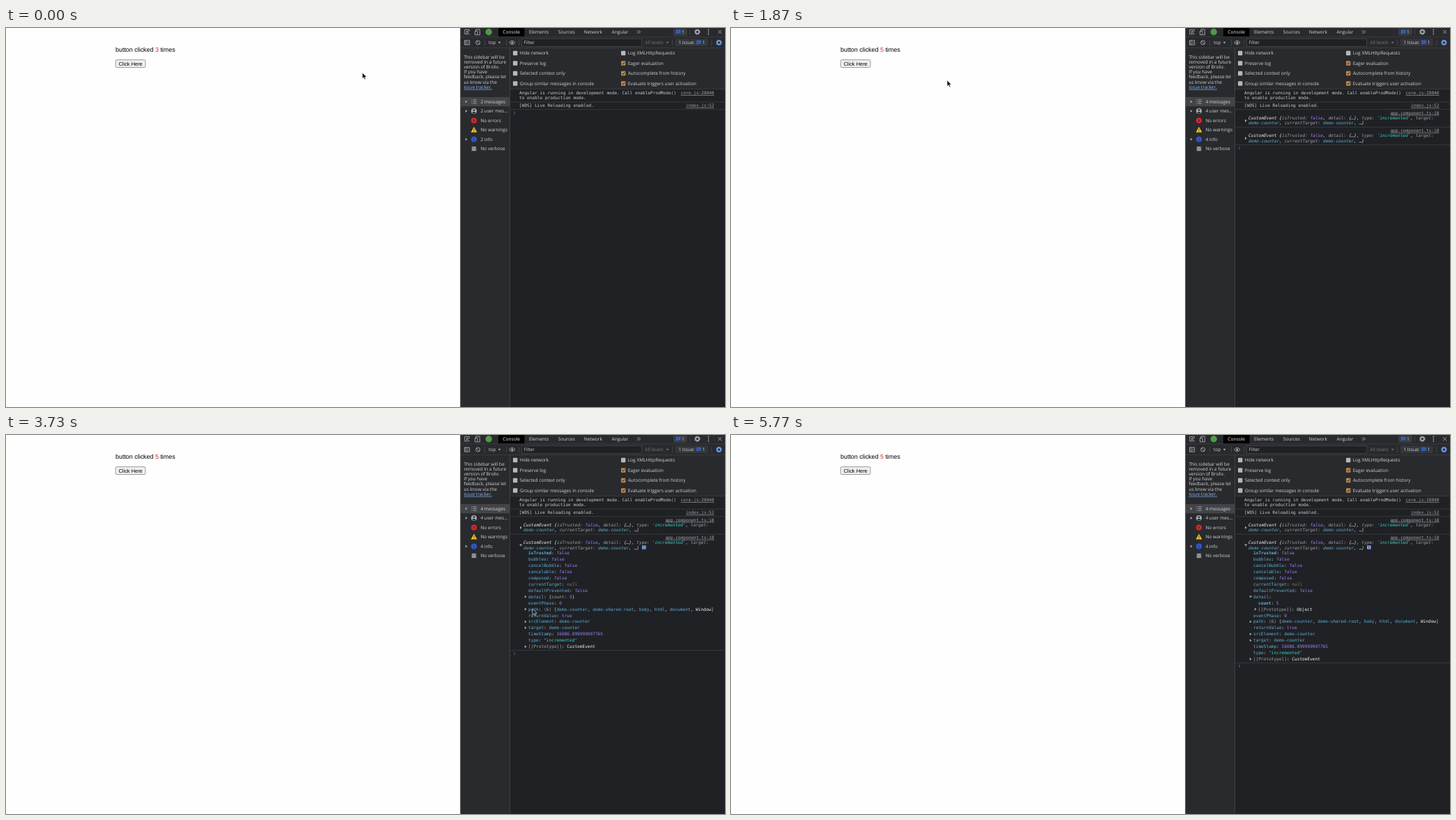
Animation, 1031 px wide and 543 px high, one loop 7.01 s. Source, as an HTML page:

```html
<!DOCTYPE html>
<html lang="en">
<head>
<meta charset="utf-8">
<title>Custom event counter</title>
<style>
  html, body { margin: 0; width: 100%; height: 100%; overflow: hidden; background: #fefefe; }
  svg { display: block; }
  text { white-space: pre; text-rendering: geometricPrecision; font: 6.6px "Open Sans", sans-serif; fill: #d0d3d6; }
  .page { font: 8.92px "Liberation Sans", sans-serif; fill: #000; }
  .label { font-size: 7.43px; }
  .mono { font: 6.13px "DejaVu Sans Mono", monospace; fill: #c9ccd0; }
  .it { font-style: italic; }
  .link { fill: #a3a7ab; text-decoration: underline; }
  .blue { fill: #8ab4f8; text-decoration: underline; }
  .dim { fill: #72767b; }
  .k { fill: #5db0d7; } .b { fill: #5db0d7; font-weight: bold; }
  .g { fill: #9aa0a6; } .p { fill: #9980ff; } .s { fill: #35d4c7; }
  .n { fill: #7f7f7f; } .w { fill: #f0f0f0; } .c { fill: #d0d3d6; } .r { fill: #d8282a; }
  .icon { fill: none; stroke: #a9adb2; stroke-width: .9; }
</style>
</head>
<body>
<svg id="stage" width="1031" height="543" viewBox="0 0 1031 543">
  <g id="fixed"></g>
  <g id="live"></g>
  <path id="cursor" d="M0 0V8.6L2 6.8 3.3 9.8 4.8 9.1 3.5 6.3H6.2Z" fill="#111" stroke="#fff" stroke-width=".6"/>
</svg>
<script>
const LOOP = 7010;
const $ = id => document.getElementById(id);

// Drawing helpers
const text = (x, y, s, cls = '', extra = '') => `<text x="${x}" y="${y}" class="${cls}" ${extra}>${s}</text>`;
const rect = (x, y, w, h, fill, extra = '') => `<rect x="${x}" y="${y}" width="${w}" height="${h}" fill="${fill}" ${extra}/>`;
const circle = (x, y, r, fill) => `<circle cx="${x}" cy="${y}" r="${r}" fill="${fill}"/>`;
const path = (d, extra = 'class="icon"') => `<path d="${d}" ${extra}/>`;
const line = (x, y, w) => rect(x, y, w, .7, '#3f4246');
const bar = (x, y, h) => rect(x, y, .7, h, '#494c50');
const right = (y, s) => text(1015.5, y, s, 'mono link', 'text-anchor="end"');
// "class|text|class|text" becomes coloured spans
const rich = (x, y, s, cls = 'mono') => {
  const parts = s.split('|');
  let spans = '';
  for (let i = 0; i < parts.length; i += 2) spans += `<tspan class="${parts[i]}">${parts[i + 1]}</tspan>`;
  return text(x, y, spans, cls);
};
const arrow = (x, y, open) => path(open ? `M${x - 2} ${y - 1.2}h4l-2 3z` : `M${x - 1.2} ${y - 2}v4l2.8-2z`, 'fill="#a3a7ab"');
const down = (x, y, fill) => path(`M${x - 1.8} ${y - 1}h3.6l-1.8 2.6z`, `fill="${fill}"`);
const gear = (x, y, color) => `<g fill="none" stroke="${color}"><circle cx="${x}" cy="${y}" r="2.5" stroke-width="1.6"/>
  <circle cx="${x}" cy="${y}" r="3.7" stroke-width="1.1" stroke-dasharray="1.6 1.306"/></g>`;
const chat = (x, y) => path(`M${x} ${y}h6v4.6h-4.4l-1.6 1.6z`, 'fill="#2f6fe8"') +
  path(`M${x + 1.2} ${y + 1.5}h3.6m-3.6 1.6h3.6`, 'stroke="#26303f" stroke-width=".6"');

function checkbox(x, y, label, on) {
  return rect(x, y - 3.2, 6.4, 6.4, on ? '#bd8750' : '#b5b7b9', 'rx=".9"') +
    (on ? path(`M${x + 1.4} ${y}l1.4 1.5 2.4-3`, 'fill="none" stroke="#26221e" stroke-width="1"') : '') +
    text(x + 9.7, y + 2.3, label);
}

function drawFixed() {
  const tabs = [[712.3, 'Console', 'w'], [750, 'Elements'], [791.7, 'Sources'], [828.7, 'Network'], [868.5, 'Angular']];
  const notice = ['This sidebar will be', 'removed in a future', 'version of Brolix.', 'If you have',
    'feedback, please let', 'us know via the', 'issue tracker.'];
  const options = [['Hide network', 'Log XMLHttpRequests'], ['Preserve log', 'Eager evaluation'],
    ['Selected context only', 'Autocomplete from history'],
    ['Group similar messages in console', 'Evaluate triggers user activation']];
  return rect(0, 0, 651.5, 543, '#fefefe') + rect(651.5, 0, 379.5, 543, '#292a2d') +
    rect(722.5, 87.5, 308.5, 455.5, '#202124') + bar(651.5, 0, 543) + bar(722, 28.5, 515) +
    // tab strip
    rect(706, 0, 37.5, 12.5, '#000') + line(652, 12.5, 379) +
    path('M663 8.8h-5.2V2.4h6.6v2.2M660.6 4.8l4.4 4.5m-4.4-1.6v-2.9h3') +
    path('M673.8 4.5v-2.5h5.5v2.5M672.5 4.5h3.6v5.3h-3.6zM676.5 9.8h3v-5') +
    circle(692.2, 5.7, 4.7, '#4f9a45') +
    tabs.map(([x, s, c]) => text(x, 8, s, c)).join('') +
    path('M905 3.4l2 2.2-2 2.2m2.6-4.4l2 2.2-2 2.2') +
    rect(957, .8, 19.5, 10, '#3a3c40', 'rx="1.2"') + chat(961, 2.7) + text(969, 8, '1') +
    bar(980.5, 2, 8) + gear(991.3, 5.6, '#a9adb2') +
    [2.5, 5.6, 8.7].map(y => circle(1007.3, y, .9, '#a9adb2')).join('') +
    path('M1021 3l5.2 5.2m0-5.2l-5.2 5.2') +
    // console toolbar
    path('M657.5 17.8h7.2v6.2h-7.2zM659.7 17.8v6.2m3.4-4.6l-1.7 1.5 1.7 1.5') +
    path('M673.7 20.9a3 3 0 1 0 6 0a3 3 0 1 0-6 0m.9-2.1l4.2 4.2') +
    bar(686, 16.5, 9) + text(692, 23.2, 'top') + down(707.6, 20.8, '#a9adb2') + bar(717, 16.5, 9) +
    path('M721.5 20.9q4.3-5.2 8.6 0q-4.3 5.2-8.6 0z') + circle(725.8, 20.9, 1.5, '#a9adb2') + bar(735.5, 16.5, 9) +
    rect(739.5, 15.5, 172, 10.8, '#202124', 'stroke="#4a4d51" stroke-width=".7"') + text(742.5, 23.2, 'Filter') +
    text(916.3, 23.2, 'All levels', 'dim') + down(948.6, 20.8, '#72767b') + bar(955, 16.5, 9) +
    rect(960, 15.6, 46.5, 10.5, '#35373b', 'rx="1.2"') + text(964.3, 23.2, '1 Issue:') + chat(990.4, 17.8) +
    text(998.5, 23.2, '1') + bar(1011.5, 16.5, 9) + gear(1022.4, 20.9, '#6ea2f5') + line(652, 28.3, 379) +
    options.map(([a, b], i) => checkbox(727, 36 + 14.5 * i, a) + checkbox(882, 36 + 14.5 * i, b, i > 0)).join('') +
    line(722, 87, 309) +
    // sidebar
    notice.map((s, i) => text(656.4, 43.5 + 7.23 * i, s, i === 6 ? 'blue' : '')).join('') +
    rect(652, 99, 70, 13.3, '#434447') +
    [105.6, 119.1, 159.6].map(y => arrow(660, y)).join('') +
    path('M667.3 103h1m1.3 0h5.2m-7.5 2.6h1m1.3 0h5.2m-7.5 2.6h1m1.3 0h5.2') +
    circle(671, 119.1, 4, '#a9adb2') + circle(671, 117.6, 1.4, '#292a2d') +
    path('M668.3 121.4q2.7-2.7 5.4 0q-2.7 2.4-5.4 0z', 'fill="#292a2d"') +
    circle(671, 132.6, 4, '#e0262b') + path('M669.4 131l3.2 3.2m0-3.2l-3.2 3.2', 'stroke="#292a2d" stroke-width=".9"') +
    path('M671 141.6l4.4 8h-8.8z', 'fill="#f4c526"') + path('M671 144.2v2.7m0 .8v1', 'stroke="#292a2d" stroke-width=".9"') +
    circle(671, 159.6, 4, '#3158d4') + path('M671 157.2v1m0 .8v3', 'stroke="#252c45" stroke-width=".9"') +
    circle(671, 173.2, 2.6, '#a9adb2') +
    path('M667.4 170.8h7.2m-7.2 2.4h7.2m-7.2 2.4h7.2M669.3 169.3l1.2 1.4m2.2-1.4l-1.2 1.4') +
    path('M670 172.4h2m-2 1.6h2', 'stroke="#292a2d" stroke-width=".6"') +
    text(680.4, 134.9, 'No errors') + text(680.4, 148.4, 'No warnings') + text(680.4, 175.4, 'No verbose') +
    // startup messages
    text(736, 95.2, 'Angular is running in development mode. Call enableProdMode()', 'mono') +
    text(736, 102.4, 'to enable production mode.', 'mono') + right(95.2, 'core.js:28040') + line(723, 105.7, 308) +
    text(736, 113.2, '[WDS] Live Reloading enabled.', 'mono') + right(113.2, 'index.js:52') + line(723, 116.4, 308);
}

// Rows of the opened event: [rich text, has arrow, indent]
const properties = detailOpen => [
  ['b|isTrusted|c|: |p|false'], ['k|bubbles|c|: |p|false'], ['k|cancelBubble|c|: |p|false'],
  ['k|cancelable|c|: |p|false'], ['k|composed|c|: |p|false'], ['k|currentTarget|c|: |n|null'],
  ['k|defaultPrevented|c|: |p|false'],
  ...(detailOpen
    ? [['k|detail|c|:', 'open'], ['b|count|c|: |p|5', '', 7], ['g|[[Prototype]]|c|: |w|Object', 'shut', 7]]
    : [['k|detail|c|: {|g|count: |p|5|c|}', 'shut']]),
  ['k|eventPhase|c|: |p|0'],
  ['k|path|c|: |g|(6) |c|[|k|demo-counter|c|, |k|demo-shared-root|c|, |k|body|c|, |k|html|c|, |k|document|c|, |w|Window|c|]', 'shut'],
  ['k|returnValue|c|: |p|true'], ['k|srcElement|c|: |k|demo-counter', 'shut'], ['k|target|c|: |k|demo-counter', 'shut'],
  ['k|timeStamp|c|: |p|16086.099999997765'], ['k|type|c|: |s|"incremented"'],
  ['g|[[Prototype]]|c|: |w|CustomEvent', 'shut']
];

function eventEntry(y, open) {
  return right(y + 2.2, 'app.component.ts:18') + arrow(738.2, y + (open ? 11 : 11.3), open) +
    rich(742, y + 9.6, "w|CustomEvent {|g|isTrusted: |p|false|c|, |g|detail: |c|{…}, |g|type: |s|'incremented'|c|, |g|target:", 'mono it') +
    rich(742, y + 16.8, 'k|demo-counter|c|, |g|currentTarget: |k|demo-counter|c|, …}', 'mono it');
}

function drawLive({ clicks, eventOpen, detailOpen, button }) {
  const count = 2 + clicks;
  let out = rich(157, 34, `|button clicked |r|${3 + clicks}|| times`, 'page') +
    rect(157.2, 45.6, 42.7, 10.9, button, 'rx="1.6" stroke="#767676" stroke-width=".7"') +
    text(161.5, 53.7, 'Click Here', 'page label') +
    text(680.4, 107.9, count + ' messages') + text(680.4, 121.4, count + ' user mes…') + text(680.4, 161.9, count + ' info');
  let y = 121.5;
  for (let i = 0; i < clicks; i++) {
    const open = eventOpen && i === 1;
    out += eventEntry(y, open);
    y += 25.2;
    if (open) {
      out += rect(912, 158.2, 5.6, 5.6, '#7f9fe8', 'rx=".8"') +
        path('M914.8 159.3v.8m0 .6v2', 'stroke="#202124" stroke-width=".8"');
      const rows = properties(detailOpen);
      rows.forEach(([s, mark, indent = 0], r) => {
        const mid = 169.1 + 8.93 * r;
        out += rich(749 + indent, mid + 2.1, s) + (mark ? arrow(745 + indent, mid + .1, mark === 'open') : '');
      });
      y += rows.length * 8.93 - 1.6;
    }
    out += line(723, y - 5, 308);
  }
  const prompt = clicks && !eventOpen ? '#3f66ee' : '#5677a8';
  return out + path(`M728 ${y - 1.8}l2 1.9-2 1.9`, `fill="none" stroke="${prompt}" stroke-width=".9"`);
}

// Pointer stops: [time, x, y]
const stops = [[30, 511, 64], [530, 172, 48], [1700, 172, 48], [2230, 734.5, 157.5], [2650, 734.5, 157.5],
  [2980, 756, 185], [3080, 756, 185], [3700, 755, 249], [3770, 755, 249], [4330, 747, 235.5], [4900, 747, 235.5],
  [5430, 785, 262], [5770, 850, -14]];

function pointer(t) {
  const next = stops.findIndex(s => s[0] > t);
  if (next < 1) return next ? stops[stops.length - 1].slice(1) : stops[0].slice(1);
  const [t0, x0, y0] = stops[next - 1], [t1, x1, y1] = stops[next];
  const u = (t - t0) / (t1 - t0), e = u * u * (3 - 2 * u);
  return [x0 + (x1 - x0) * e, y0 + (y1 - y0) * e];
}

let shown = '';
function frame(now) {
  const t = now % LOOP;
  const [x, y] = pointer(t);
  const pressed = (t >= 830 && t < 930) || (t >= 1530 && t < 1630);
  const hover = x > 157 && x < 200 && y > 45 && y < 57;
  const state = {
    clicks: (t >= 930) + (t >= 1630),
    eventOpen: t >= 2570,
    detailOpen: t >= 4800,
    button: pressed ? '#f5f5f5' : hover ? '#e3e3e3' : '#efefef'
  };
  const key = JSON.stringify(state);
  if (key !== shown) {
    $('live').innerHTML = drawLive(state);
    shown = key;
  }
  $('cursor').setAttribute('transform', `translate(${x.toFixed(2)} ${y.toFixed(2)})`);
  requestAnimationFrame(frame);
}

$('fixed').innerHTML = drawFixed();
const start = performance.now();
requestAnimationFrame(() => frame(0));
const tick = frame;
frame = now => tick(Math.max(0, now - start));
</script>
</body>
</html>
```
